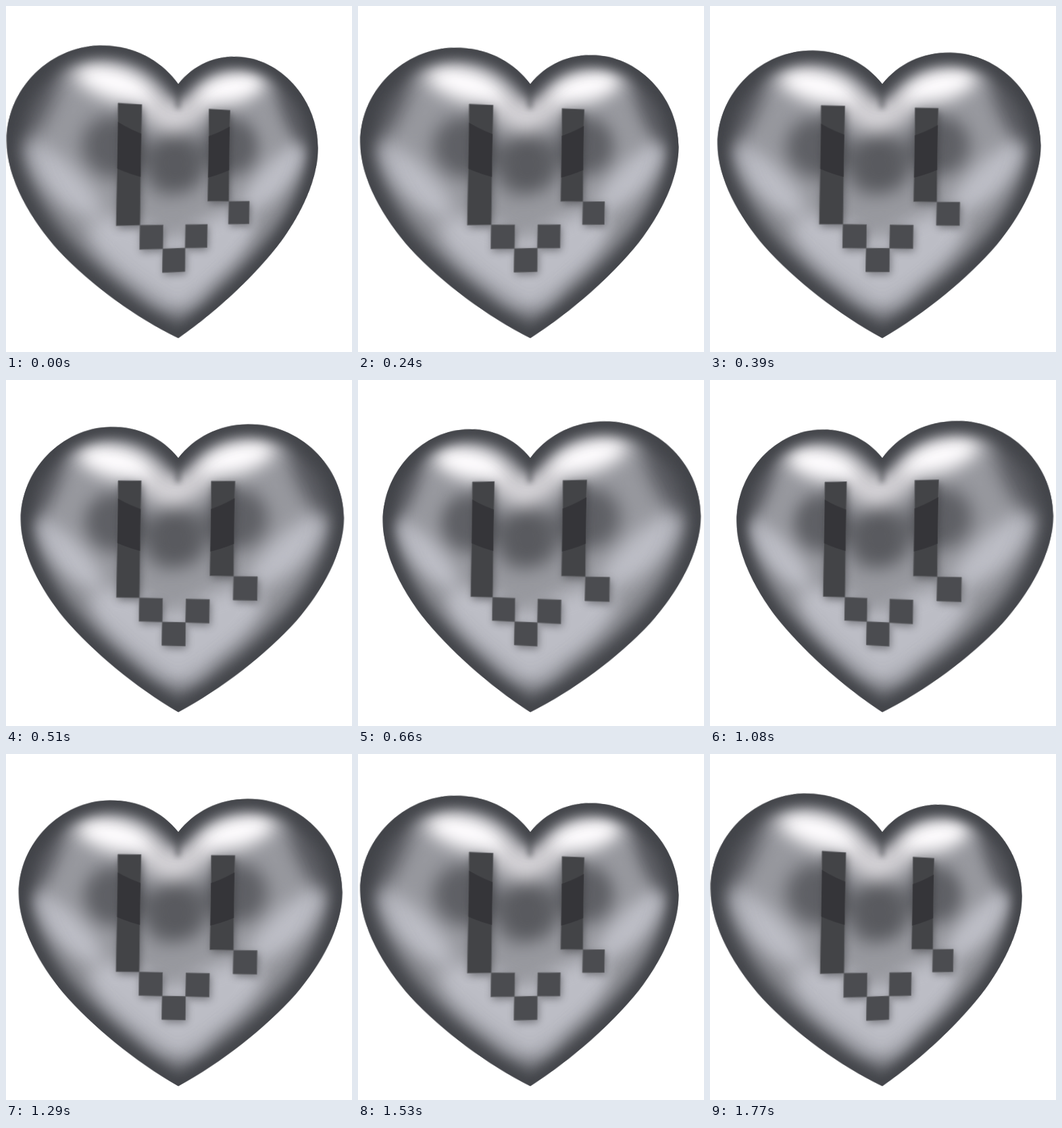
Write an HTML page that moves like this. It is 512 px wide and 512 px high and loops after 1.8 s.

```html
<!DOCTYPE html>
<html lang="en">
<head>
<meta charset="utf-8">
<title>Swinging metal heart</title>
<style>
  html, body { margin: 0; width: 100%; height: 100%; overflow: hidden; background: #fff; }
  #stage { position: relative; width: 100%; height: 100%; overflow: hidden; contain: strict; }
  #heart {
    position: absolute; left: 0; top: 0; width: 512px; height: 512px;
    transform-origin: 254.5px 256px; will-change: transform;
  }
  #shine { filter: blur(13px); }
  .seam { stroke: #77787d; stroke-width: 7; filter: blur(4px); }
  .rim { fill: none; stroke: #414348; }
  .wide { stroke-width: 44; opacity: .6; filter: blur(15px); }
  .near { stroke-width: 30; filter: blur(9px); }
  .shadow { fill: #37383c; opacity: .5; filter: blur(6px); }
  .band { fill: none; stroke: #303134; stroke-width: 60; opacity: .75; }
</style>
</head>
<body>
<div id="stage">
<svg id="heart" viewBox="0 0 512 512">
  <defs>
    <path id="half" d="M254 115C230 85 195 67 152 67C78 67 14.5 130 14.5 205
      C14.5 255 45 310 82 354C125 403 190 455 254 491"/>
    <path id="outline" transform="translate(1 .5)" d="M254 115C230 85 195 67 152 67C78 67 14.5 130 14.5 205
      C14.5 255 45 310 82 354C125 403 190 455 254 491C318 455 383 403 426 354
      C463 310 493.5 255 493.5 205C493.5 130 430 67 356 67C313 67 278 85 254 115Z"/>
    <clipPath id="body"><use href="#outline"/></clipPath>
    <clipPath id="bars"></clipPath>
  </defs>
  <g clip-path="url(#body)">
    <use href="#outline" fill="#97989e"/>
    <g id="shine"></g>
    <path class="seam" d="M254.5 108V152"/>
    <use href="#outline" class="rim wide" y="-10"/>
    <use href="#outline" class="rim near"/>
  </g>
  <g class="shadow" transform="translate(2 4)"><g id="shadow"></g></g>
  <g id="face" stroke="#636468" stroke-width="1"></g>
  <g clip-path="url(#bars)"><path class="band" d="M140 195Q252 265 364 195"/></g>
</svg>
</div>
<script>
const NS = 'http://www.w3.org/2000/svg';
const byId = id => document.getElementById(id);

function add(parent, tag, attrs) {
  const el = document.createElementNS(NS, tag);
  for (const key in attrs) el.setAttribute(key, attrs[key]);
  return parent.appendChild(el);
}

// Reflections of one lobe; the other lobe is their mirror image
function reflect(side) {
  const lobe = add(byId('shine'), 'g', { transform: side });
  const spot = (fill, cx, cy, rx, ry, turn, opacity = 1) => add(lobe, 'ellipse', {
    cx, cy, rx, ry, fill, opacity, transform: `rotate(${turn} ${cx} ${cy})`
  });
  const pale = '#bcbdc5', dark = '#505257';
  spot(pale, 215, 385, 110, 48, 36);
  spot(pale, 78, 254, 80, 26, 40);
  spot(dark, 45, 150, 28, 65, 25, .85);
  spot(dark, 160, 210, 46, 44, 12, .8);
  spot(dark, 242, 236, 44, 44, 0, .65);
  spot('#d4d2d6', 226, 154, 48, 22, 40);
  spot('#fffdff', 160, 119, 58, 25, 14);
}
reflect('');
reflect('translate(500 -4) scale(-1 1)');

// The face sits on a slightly tilted grid of square cells
function cell(col, row, rows = 1) {
  const at = (c, r) => [165 + 34.7 * c - 0.55 * r, 148 + 0.55 * c + 34.85 * r];
  const points = [at(col, row), at(col + 1, row), at(col + 1, row + rows), at(col, row + rows)].join(' ');
  const isBar = rows > 1;
  add(byId('shadow'), 'polygon', { points });
  add(byId('face'), 'polygon', { points, fill: isBar ? '#434447' : '#4b4c50' });
  if (isBar) add(byId('bars'), 'polygon', { points });
}
cell(0, 0, 5);
cell(4, 0, 4);
cell(1, 5);
cell(2, 6);
cell(3, 5);
cell(5, 4);

const LOOP = 1800, STEP = 30, SWING = 17.8;
const LAST = LOOP / STEP - 1;
const heart = byId('heart');
const start = performance.now();

function draw(now) {
  const time = Math.max(0, now - start) % LOOP;
  const phase = Math.floor(time / STEP) / LAST;
  const angle = SWING * Math.cos(2 * Math.PI * phase);
  heart.style.transform = `perspective(713px) rotateY(${angle.toFixed(3)}deg)`;
  requestAnimationFrame(draw);
}
draw(start);
</script>
</body>
</html>
```
